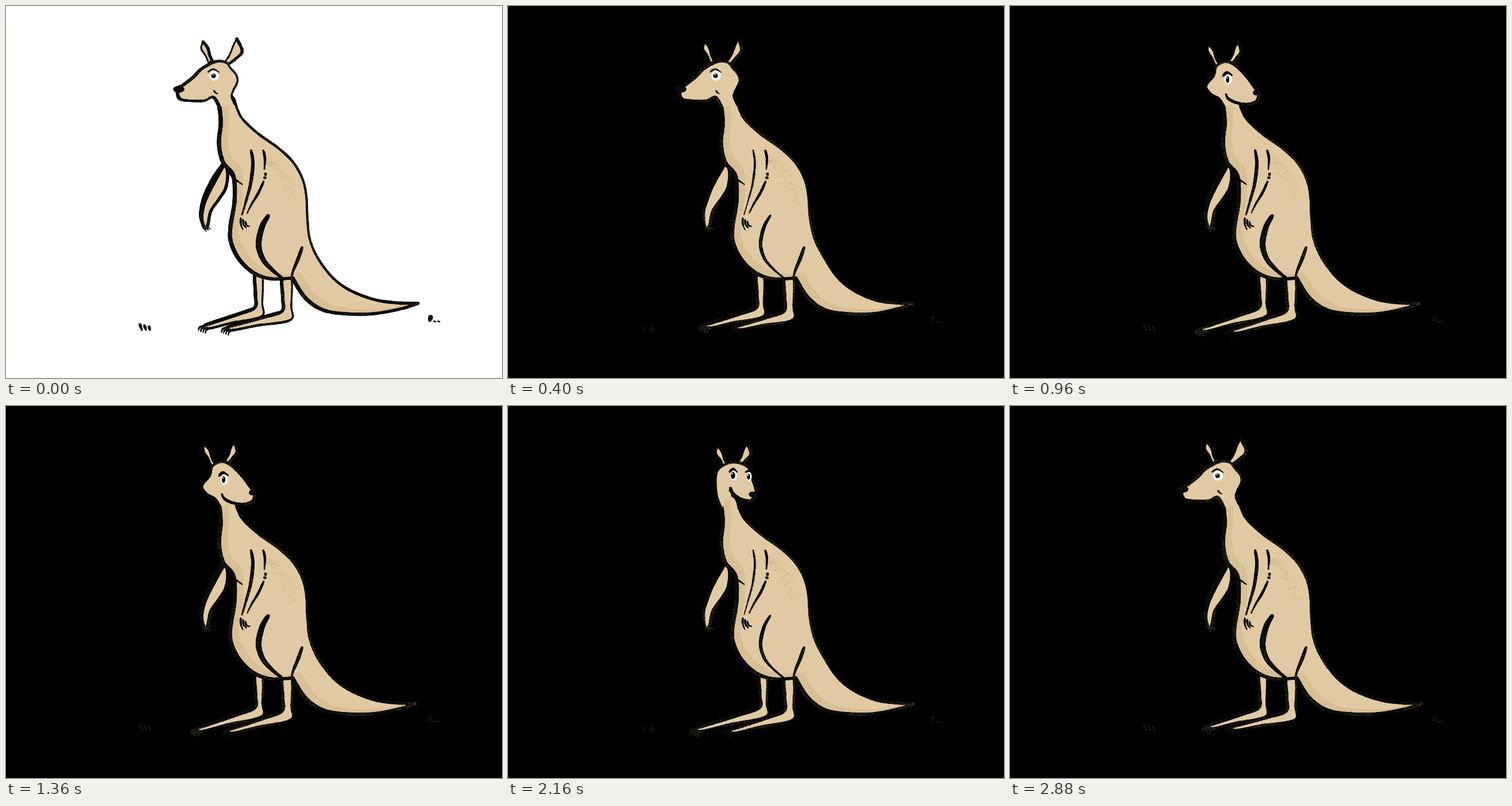
Recreate the animation shown at these times as an HTML page with a canvas. Size 864 px wide and 648 px high, loop 2960 ms.

```html
<!DOCTYPE html>
<html lang="en">
<head>
<meta charset="utf-8">
<title>Kangaroo</title>
<style>
html, body { margin: 0; width: 100%; height: 100%; overflow: hidden; background: #000; }
canvas { display: block; width: 864px; height: 648px; }
</style>
</head>
<body>
<canvas id="stage" width="864" height="648"></canvas>
<script>
const W = 864, H = 648, STEP = 80, LOOP = 2960;
const INK = '#0b0b0b', FUR = '#e1caa3', SHADE = '#d8bf94', GRAIN = 'rgba(125,110,88,.38)';

let seed = 1;
const rand = () => (seed = (seed * 16807) % 2147483647) / 2147483647;
const spread = r => (rand() * 2 - 1) * r;
const clamp = v => Math.max(0, Math.min(1, v));
const parse = s => s.trim().split(/\s+/).map(p => p.split(',').map(Number));

// Catmull-Rom curve through the points; a doubled point makes a corner.
function curve(pts, closed) {
  const n = pts.length, out = [];
  const at = i => closed ? pts[(i + n) % n] : pts[Math.max(0, Math.min(n - 1, i))];
  for (let i = 0; i < (closed ? n : n - 1); i++) {
    const [a, b, c, d] = [at(i - 1), at(i), at(i + 1), at(i + 2)];
    const steps = Math.ceil(Math.hypot(c[0] - b[0], c[1] - b[1]));
    for (let k = 0; k < steps; k++) {
      const t = k / steps;
      out.push(b.map((v, j) => v + t / 2 * (c[j] - a[j] +
        t * (2 * a[j] - 5 * v + 4 * c[j] - d[j] + t * (3 * (v - c[j]) + d[j] - a[j])))));
    }
  }
  return out;
}

function fill(g, path, color) {
  g.fillStyle = color;
  g.beginPath();
  path.forEach(p => g.lineTo(...p));
  g.closePath();
  g.fill();
}

// A dry brush: round dabs, then patches of grain inside the stroke.
function brush(g, path, width) {
  const sizes = path.map((p, i) => Math.max(1, width(i) + spread(.5)));
  g.fillStyle = INK;
  path.forEach(([x, y], i) => {
    g.beginPath();
    g.arc(x, y, sizes[i] / 2, 0, 7);
    g.fill();
  });
  g.fillStyle = GRAIN;
  path.forEach(([x, y], i) => {
    if (Math.sin(i / 23 + x / 40) + rand() < .5) return;
    const r = sizes[i] / 2 - .5;
    g.fillRect(x + spread(r), y + spread(r), 1.3, 1.3);
  });
}

// Lines running down are heavier than lines running up.
function outline(g, path, w) {
  brush(g, path, i => {
    const [x, y] = path[i], [u, v] = path[Math.min(i + 1, path.length - 1)];
    return w * (1 + .3 * (v - y) / (Math.hypot(u - x, v - y) || 1));
  });
}

function shape(g, pts, w, closed = true) {
  const path = curve(pts, closed);
  fill(g, path, FUR);
  outline(g, path, w);
}

function stroke(g, pts, w) {
  const path = curve(typeof pts === 'string' ? parse(pts) : pts);
  brush(g, path, i => w * (.45 + .55 * Math.sin(Math.PI * (i / path.length) ** .6)));
}

function oval(g, x, y, rx, ry, color = INK) {
  g.fillStyle = color;
  g.beginPath();
  g.ellipse(x, y, rx, ry, 0, 0, 7);
  g.fill();
}

function eye(g, x, y, rx, ry, px, py) {
  oval(g, x, y, rx, ry, '#fff');
  oval(g, x - 1, y, px, py);
  oval(g, x - 2, y - py / 2, 1, 1.3, '#fff');
}

// Ear from base to tip, bulging l to the left and r to the right.
function ear(g, bx, by, tx, ty, l, r) {
  const len = Math.hypot(tx - bx, ty - by), nx = (by - ty) / len, ny = (tx - bx) / len;
  const at = (t, side) => [bx + (tx - bx) * t + nx * side, by + (ty - by) * t + ny * side];
  shape(g, [at(0, -3), at(.35, -l * .6), at(.72, -l), at(1, 0), at(1, 0),
    at(.65, r), at(.3, r * .7), at(0, 3)], 4);
}

// Straight shin with a long wedge of a foot.
function leg(g, x, top, half, heel, tx, ty) {
  const ankle = [x - half - 2, heel - 14];
  shape(g, [[x - half, top], [x - half + 1, top + 35], ankle, [(ankle[0] + tx) / 2, (ankle[1] + ty) / 2 - 2],
    [tx, ty - 3], [tx + 5, ty + 3], [(x + tx) / 2, (heel + ty) / 2 + 2], [x + half - 2, heel],
    [x + half, heel - 25], [x + half, top]], 4.5);
  stroke(g, [ankle, [tx + 4, ty - 3]], 6);
  for (let i = 0; i < 4; i++) {
    const cx = tx - 4 + i * 4, cy = ty - 2 + i * 1.5;
    stroke(g, [[cx, cy], [cx - 6, cy + 3], [cx - 8, cy + 9]], 3.5);
  }
}

const TORSO = parse(`366,150 372,178 374,205 371,240 378,272 396,296 398,340 391,385 392,412 406,441
  430,464 460,475 499,474 499,474 521,508 551,529 590,536 640,536 690,527 718,518 718,518 680,517
  640,511 597,494 567,471 542,437 529,405 525,370 523,330 516,300 500,272 475,248 440,223 413,198
  403,180 394,158`);

const heads = {
  left(g, o) {
    ear(g, 356, 97, 343, 62, 7, 4);
    ear(g, 384, 100, 402, 57, 1, o.loose ? 12 : 17);
    shape(g, parse(`399,172 393,158 396,147 403,132 401,120 391,108 384,99 372,96 359,99 340,110
      325,125 308,138 299,144 302,161 320,165 345,165 361,159 372,176`), 4.5, false);
    stroke(g, '362,147 365,151 369,153', 3);
    stroke(g, '352,115 361,110 372,116', 3);
    oval(g, 301, 145, 10, 6);
    eye(g, 362.5, 121.5, 8.5, 8.5, 4, 4);
  },
  right(g) {
    ear(g, 361, 102, 346, 66, 6, 4);
    ear(g, 384, 99, 398, 63, 2, 10);
    shape(g, parse(`374,176 365,162 350,153 342,139 355,122 360,105 375,97 391,102 410,120 430,147
      433,158 428,167 412,171 393,168`), 4.5, false);
    stroke(g, '376,153 380,161 393,168 412,171 429,167', 5);
    stroke(g, '371,122 378,116 387,121', 5);
    oval(g, 428, 151, 5, 4.5);
    eye(g, 380, 128, 6.5, 9, 3, 6);
  },
  turn(g) {
    ear(g, 380, 105, 366, 69, 8, 3);
    ear(g, 403, 101, 417, 66, 2, 12);
    shape(g, parse(`372,178 364,156 362,130 365,113 376,103 392,98 410,101 422,110 426,125 433,150
      428,160 421,165 405,161 391,152`), 4.5, false);
    stroke(g, '387,142 392,153 405,162 420,164', 6);
    stroke(g, '385,148 391,142', 2.5);
    stroke(g, '386,115 392,110 399,115', 5);
    stroke(g, '414,115 420,113 424,117', 4);
    oval(g, 426, 154, 6.5, 5);
    eye(g, 393, 121, 6, 8.5, 3.8, 6);
    eye(g, 420, 123, 4.5, 8, 2.8, 5);
  }
};

// The loose drawing swings the rump out; every drawing has its own tail length.
function warp([x, y], o) {
  const swing = o.loose ? 8 * Math.exp(-(((y - 440) / 50) ** 2)) * clamp((x - 490) / 30) : 0;
  const tail = Math.max(0, x - 600) * (o.tip - 718) / 118;
  return [x + swing + tail, y];
}

function torso(g, o) {
  const path = curve(TORSO.map(p => warp(p, o)), true);
  g.save();
  fill(g, path, SHADE);
  g.clip();
  g.translate(15, -9);
  fill(g, path, FUR);
  g.restore();
  g.fillStyle = 'rgba(170,140,98,.4)';
  for (let i = 0; i < 200; i++) {
    const t = rand();
    g.fillRect(460 + 55 * t - rand() * 22, 262 + 75 * t * t + rand() * 12, 1.2, 1.2);
  }
  outline(g, path, 5.4);
}

function details(g, o) {
  const k = o.loose ? .6 : 1;
  stroke(g, '386,285 396,299 412,311', 4);
  stroke(g, '457,365 446,385 440,415 447,440 462,458 481,474', 10 * k);
  stroke(g, '516,420 509,440 500,462 497,476', 6);
  stroke(g, '427,251 430,275 426,310 418,340 411,364', 6 * k);
  stroke(g, '448,251 451,265 450,285', 4.5);
  stroke(g, '449,305 440,325 428,345 420,361', 4.5);
  oval(g, 452, 293, 2.5, 3);
  oval(g, 451, 299, 3, 2.5);
  for (let i = 0; i < 3; i++)
    stroke(g, [[409 + i * 4, 369 + i * 3], [409 + i * 5, 380 + i], [413 + i * 6, 390 - i * 3]], 3.5);
}

function farArm(g, o) {
  shape(g, parse('379,277 386,290 383,316 372,335 357,357 351,383 344,386 342,360 348,338 362,303'), 4);
  stroke(g, '378,277 362,303 346,336 340,365 345,386', o.loose ? 5 : 11);
  for (let i = 0; i < 3; i++) stroke(g, [[344 + i * 3, 385], [349 + i * 4, 393 - i * 2]], 2.5);
}

function grass(g, o) {
  const w = o.loose ? 2.5 : 5;
  for (let i = 0; i < 3; i++) stroke(g, [[233 + i * 8, 554 + i * 2], [237 + i * 7, 565]], w);
  stroke(g, '740,541 738,548', 8);
  for (let i = 0; i < 2; i++) stroke(g, [[745 + i * 7, 549], [749 + i * 7, 550]], 3);
}

function pose(head, o) {
  seed = o.loose ? 977 : 4711;
  const g = document.createElement('canvas').getContext('2d');
  g.canvas.width = W;
  g.canvas.height = H;
  grass(g, o);
  farArm(g, o);
  leg(g, o.farX, 468, 6.5, 541, o.far, o.toeY);
  leg(g, 489, 474, 8, 547, o.near, o.toeY + 3);
  torso(g, o);
  details(g, o);
  heads[head](g, o);
  return g.canvas;
}

const turned = { loose: true, tip: 707, farX: 444, far: 329, near: 388, toeY: 564 };
const poses = {
  leftA: pose('left', { tip: 718, farX: 440, far: 347, near: 387, toeY: 559 }),
  leftB: pose('left', { loose: true, tip: 704, farX: 439, far: 345, near: 399, toeY: 558 }),
  rightA: pose('right', { tip: 714, farX: 440, far: 334, near: 388, toeY: 564 }),
  rightB: pose('right', turned),
  turn: pose('turn', turned)
};

// Two drawings alternate for each view, with one turning drawing between views.
function poseAt(i) {
  if (i === 11 || i === 27) return poses.turn;
  if (i < 11 || i > 27) return i % 2 ? poses.leftB : poses.leftA;
  return i === 12 || i % 2 ? poses.rightA : poses.rightB;
}

const view = document.getElementById('stage').getContext('2d');
const start = performance.now();
let shown = -1;

function draw(now) {
  const i = Math.floor(Math.max(0, now - start) % LOOP / STEP);
  if (i !== shown) {
    shown = i;
    view.fillStyle = i ? '#000' : '#fff';
    view.fillRect(0, 0, W, H);
    view.drawImage(poseAt(i), 0, 0);
  }
  requestAnimationFrame(draw);
}
draw(start);
</script>
</body>
</html>
```
